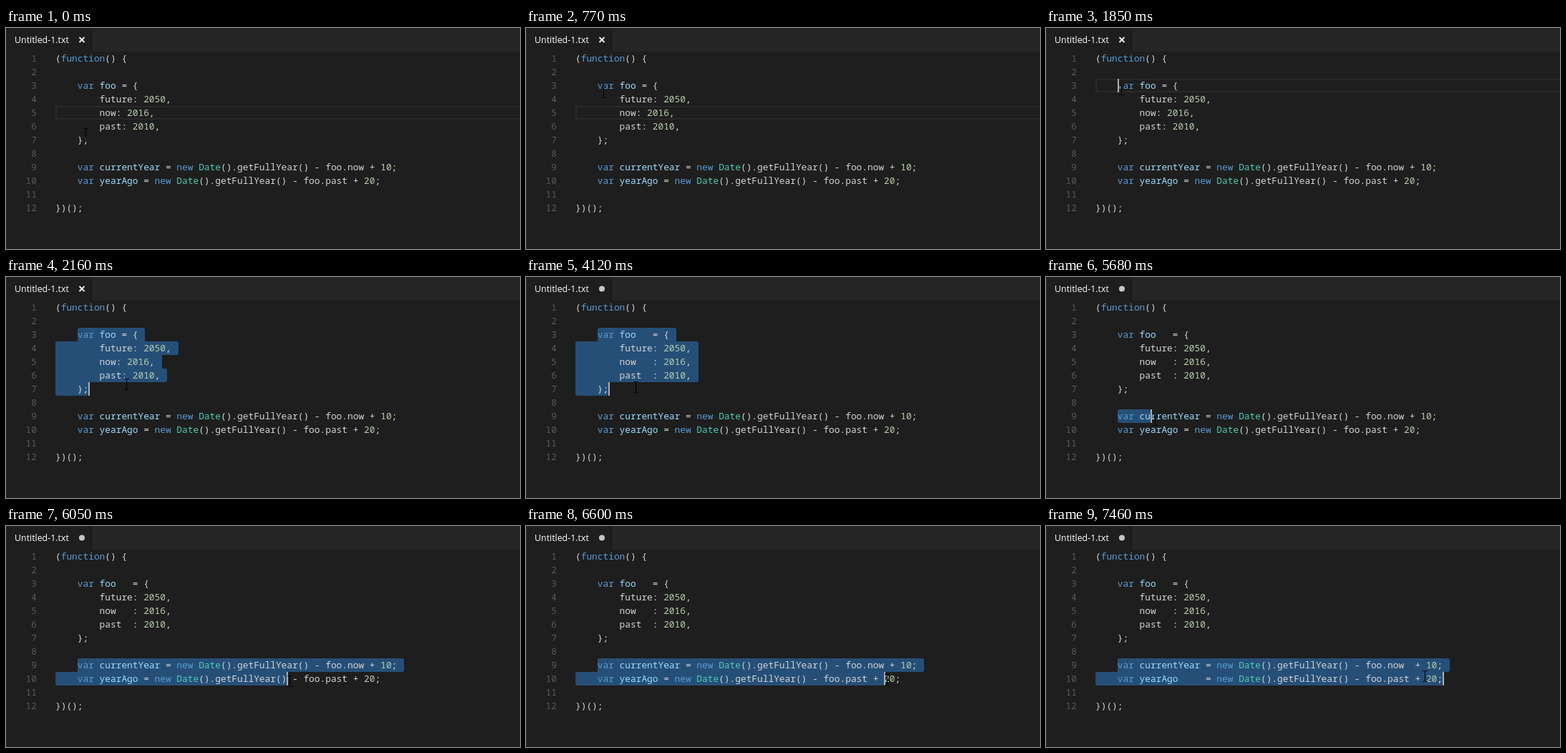
Animation of 718 by 309 pixels, one loop 7840 ms. Source, as an HTML page with a canvas:

```html
<!DOCTYPE html>
<html>
<head>
<meta charset="utf-8">
<style>
html, body { margin: 0; width: 100%; height: 100%; overflow: hidden; background: #1e1e1e; }
canvas { display: block; }
</style>
</head>
<body>
<canvas width="718" height="309"></canvas>
<script>
const ctx = document.querySelector('canvas').getContext('2d');
const LOOP = 7840, LEFT = 69, TOP = 33, CHAR = 7.698, ROW = 19;
const ALIGN_OBJECT = 3410, ALIGN_VARS = 7310, FIRST_CLICK = 1770, SECOND_CLICK = 5510;

// "~" and "^" become spaces once the first and second blocks are aligned
const code = `(function() {

    var foo~~ = {
        future: 2050,
        now~~~: 2016,
        past~~: 2010,
    };

    var currentYear = new Date().getFullYear() - foo.now^ + 10;
    var yearAgo^^^^ = new Date().getFullYear() - foo.past + 20;

})();`;
const token = /\b(function|var|new)\b|(?<=var )(\w+)|\b(Date)\b|\b(\d+)|(\w+|\S)/g;
const tokenColors = ['#569cd6', '#9cdcfe', '#4ec9b0', '#b5cea8', '#d4d4d4'];

// Pointer moves: first step, last step, number of steps, x and y reached
const start = [108, 140];
const moves = [
  [150, 300, 3, 122, 147], [380, 840, 7, 102, 71], [1390, 1390, 1, 101, 72],
  [1620, 1620, 1, 100, 73], [1770, 1850, 2, 102, 78], [1940, 2160, 4, 165, 142],
  [2390, 2390, 1, 164, 145], [4120, 4120, 1, 150, 146], [4270, 4730, 7, 100, 180],
  [4900, 5040, 3, 99, 185], [5210, 5210, 1, 100, 188], [5680, 6050, 6, 393, 209],
  [6140, 6450, 5, 476, 210], [6520, 6750, 4, 526, 204], [7460, 7460, 1, 526, 202]
];

const colX = col => LEFT + col * CHAR;
const rowY = row => TOP + row * ROW;
const linesAt = t => code
  .replace(/~/g, t >= ALIGN_OBJECT ? ' ' : '')
  .replace(/\^/g, t >= ALIGN_VARS ? ' ' : '')
  .split('\n');

function rect(x, y, w, h, color) {
  ctx.fillStyle = color;
  ctx.fillRect(x, y, w, h);
}

function pointerAt(t) {
  let [x, y] = start;
  for (const [from, to, steps, nx, ny] of moves) {
    if (t < from) break;
    const step = t >= to ? steps : 1 + Math.floor((t - from) / (to - from) * (steps - 1));
    x += (nx - x) * step / steps;
    y += (ny - y) * step / steps;
  }
  return [Math.round(x), Math.round(y)];
}

// Where the drag has put the caret; a drag past the line end sticks to it
function caretAt(t, lines) {
  const dragTime = Math.min(t, t < SECOND_CLICK ? 2160 : 6750);
  const [x, y] = pointerAt(dragTime);
  const row = Math.floor((y + 8 - TOP) / ROW);
  const col = Math.floor((x + 4 - LEFT) / CHAR);
  const atEnd = col >= linesAt(dragTime)[row].length;
  return { row, col: atEnd ? lines[row].length : Math.max(col, 4) };
}

function drawTab(t) {
  rect(121, 0, 597, TOP, '#252526');
  rect(0, 0, 1, 309, '#303030');
  ctx.font = '12.4px "Open Sans", sans-serif';
  ctx.textAlign = 'left';
  ctx.fillStyle = '#fff';
  ctx.fillText('Untitled-1.txt', 12, 21);
  ctx.beginPath();
  if (t >= 3480) {
    ctx.arc(106, 16.5, 4, 0, 7);
    ctx.fillStyle = '#c5c5c5';
    ctx.fill();
  } else {
    ctx.moveTo(102.5, 13); ctx.lineTo(109.5, 20);
    ctx.moveTo(109.5, 13); ctx.lineTo(102.5, 20);
    ctx.strokeStyle = '#e8e8e8';
    ctx.lineWidth = 2;
    ctx.stroke();
  }
}

function drawLineHighlight(row) {
  ctx.strokeStyle = '#2a2a2a';
  ctx.lineWidth = 2;
  ctx.strokeRect(LEFT + 1, rowY(row) + 1, 718, ROW - 2);
}

function drawSelection(first, caret, lines) {
  const spans = [];
  for (let row = first; row <= caret.row; row++) {
    const left = row === first ? Math.round(colX(4)) : LEFT;
    const right = row === caret.row ? colX(caret.col) : colX(lines[row].length) + 10;
    spans.push([left, Math.round(right)]);
  }
  ctx.fillStyle = '#264f78';
  spans.forEach(([left, right], i) => {
    const corner = (other, x) => other && other[0] <= x && other[1] >= x ? 0 : 3;
    const above = spans[i - 1], below = spans[i + 1];
    ctx.beginPath();
    ctx.roundRect(left, rowY(first + i), right - left, ROW,
      [corner(above, left), corner(above, right), corner(below, right), corner(below, left)]);
    ctx.fill();
  });
}

function drawCode(lines) {
  ctx.font = '12.83px "Noto Sans Mono", monospace';
  lines.forEach((line, row) => {
    const baseline = rowY(row) + 14;
    ctx.textAlign = 'right';
    ctx.fillStyle = '#5a5a5a';
    ctx.fillText(row + 1, 43, baseline);
    ctx.textAlign = 'left';
    for (const match of line.matchAll(token)) {
      ctx.fillStyle = tokenColors[match.slice(1).findIndex(Boolean)];
      [...match[0]].forEach((ch, i) => ctx.fillText(ch, colX(match.index + i), baseline));
    }
  });
}

function drawPointer([x, y]) {
  rect(x + 3, y + 1, 1, 14, '#000');
  for (const end of [y, y + 15]) {
    rect(x, end, 3, 1, '#000');
    rect(x + 4, end, 3, 1, '#000');
  }
}

function draw(t) {
  const lines = linesAt(t);
  rect(0, 0, 718, 309, '#1e1e1e');
  drawTab(t);
  if (t < FIRST_CLICK) {
    drawLineHighlight(4);
    drawCode(lines);
  } else {
    const first = t < SECOND_CLICK ? 2 : 8;
    const caret = caretAt(t, lines);
    if (caret.row === first && caret.col === 4) drawLineHighlight(first);
    else drawSelection(first, caret, lines);
    drawCode(lines);
    const blinkedOff = t >= 4730 && t < 5210;
    if (!blinkedOff) rect(Math.round(colX(caret.col)), rowY(caret.row), 2, ROW, '#aeafad');
  }
  drawPointer(pointerAt(t));
}

const origin = performance.now();
function frame() {
  draw((performance.now() - origin) % LOOP);
  requestAnimationFrame(frame);
}
frame();
</script>
</body>
</html>
```
